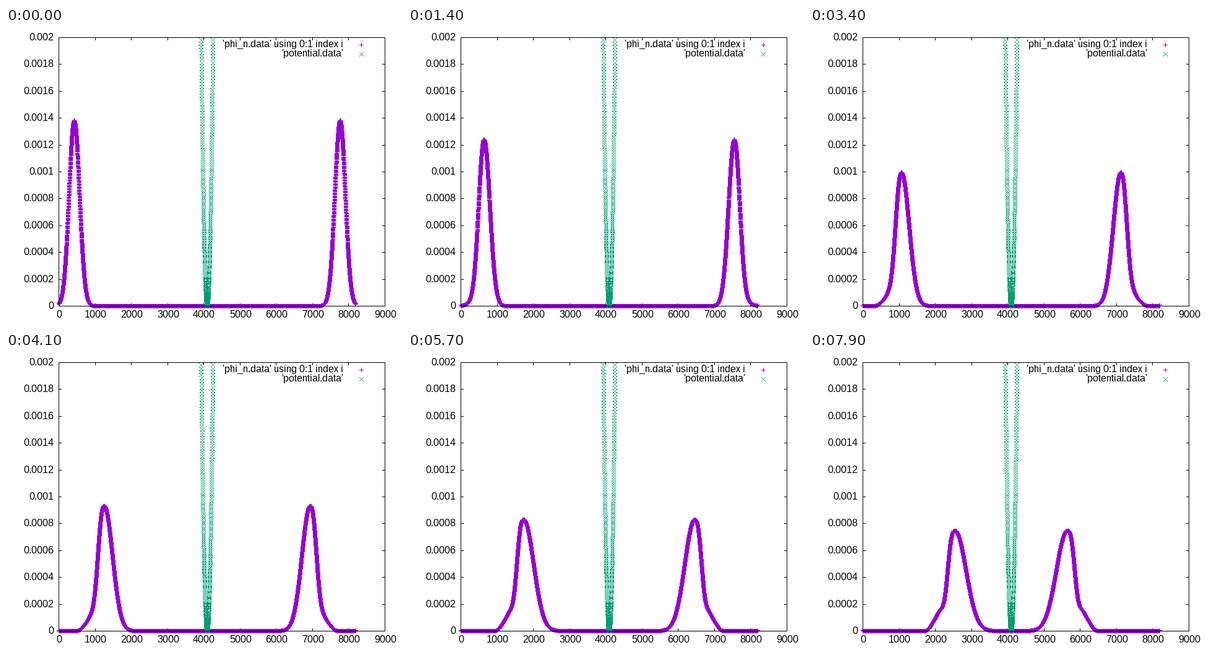
Recreate the animation shown at these times as a matplotlib script. Size 640 by 480 pixels, loop 8 s.

```python
import numpy as np
import matplotlib.pyplot as plt
from matplotlib.animation import FuncAnimation
from matplotlib.markers import MarkerStyle
from matplotlib.path import Path
from matplotlib.transforms import Affine2D

W, H, DPI = 640, 480, 100
PX = 72 / DPI                      # one pixel in points
LEFT, RIGHT, TOP, BASE = 85, 612, 15, 449
TIC = 4
FRAMES, INTERVAL = 80, 100
N = 8192
PURPLE, GREEN = "#9400d3", "#009e73"

plt.rcParams["font.family"] = "Liberation Sans"
plt.rcParams["font.size"] = 16 * PX
plt.rcParams["text.hinting"] = "native"
plt.rcParams["text.hinting_factor"] = 1

fig = plt.figure(figsize=(W / DPI, H / DPI), dpi=DPI, facecolor="white")
ax = fig.add_axes([0, 0, 1, 1])
ax.set_xlim(0, W)
ax.set_ylim(H, 0)
ax.axis("off")


def px_x(v):
    return LEFT + v * (RIGHT - LEFT) / 9000


def px_y(v):
    return BASE - v * (BASE - TOP) / 0.002


def line(xs, ys, z):
    ax.plot(xs, ys, color="black", lw=PX, zorder=z,
            solid_capstyle="projecting", solid_joinstyle="miter")


def pixel(dx, dy):
    return Path.unit_rectangle().transformed(Affine2D().translate(dx, dy - 1))


# Diagonal cross built from whole pixels, so that it stays one pixel thin
CROSS = Path.make_compound_path(
    *[pixel(d, s * d) for d in range(-3, 4) for s in (1, -1)])


def pluses(xs, ys):
    return ax.plot(xs, ys, ls="none", color=PURPLE, ms=6 * PX, mew=PX,
                   marker=MarkerStyle("+", capstyle="projecting"),
                   zorder=2, antialiased=False)[0]


def crosses(xs, ys):
    ax.plot(xs, ys, ls="none", marker=CROSS, ms=8 * PX, mew=0,
            mfc=GREEN, mec="none", zorder=3)


def label(x, y, s, ha="right"):
    ax.text(x, y, s, ha=ha, va="baseline")


# Frame, tics and labels
line([LEFT, RIGHT, RIGHT, LEFT, LEFT], [TOP, TOP, BASE, BASE, TOP], 4)
for i in range(10):
    x = round(px_x(1000 * i))
    line([x, x], [BASE, BASE - TIC], 1)
    line([x, x], [TOP, TOP + TIC], 1)
    label(x + 1, 468, str(1000 * i), "center")
for i in range(11):
    y = round(px_y(0.0002 * i))
    line([LEFT, LEFT + TIC], [y, y], 1)
    line([RIGHT, RIGHT - TIC], [y, y], 1)
    label(77, y + 5, f"{0.0002 * i:.4f}".rstrip("0").rstrip("."))

# Key
label(545, 31, "'phi_n.data' using 0:1 index i")
label(545, 46, "'potential.data'")
pluses([574], [27])
crosses([574], [42])

# Harmonic well, cut off at the top of the plot
n = np.arange(N + 1)
well = 5 * (n / N - 0.5) ** 2
inside = well <= 0.002
crosses(px_x(n[inside]), px_y(well[inside]))

xs = px_x(n)
wave = pluses(xs, np.full(N + 1, BASE))


def gauss(d, s):
    return np.exp(-0.5 * (d / s) ** 2)


def packet(t):
    """Height in pixels of the packet that speeds up to the right."""
    s = t / 7.9
    ease = s * s * (3 - 2 * s)
    peak = 125 + 175 / (1 + (t / 3.55) ** 1.65)
    d = xs - (110 + 7.6 * t + 1.03 * t * t)
    back = np.maximum(-d, 0)
    # The rear gets steeper and trails two ripples
    lag, bump = 19 + 4.5 * s, 0.2 * ease
    rear = np.exp(-(back / (11.8 + 2.6 * s)) ** (2 + 0.9 * ease))
    rear += bump * gauss(back - lag, lag / 3.2)
    rear += 0.2 * bump * gauss(back - 1.55 * lag, lag / 5)
    return peak * np.where(d > 0, gauss(d, 8.5 + 9 * ease), rear)


def update(i):
    t = i * INTERVAL / 1000
    h = packet(t)
    h[0] = max(h[0], 3 * np.exp(-t / 5))
    wave.set_ydata(BASE - h - h[::-1])
    return [wave]


anim = FuncAnimation(fig, update, frames=FRAMES, interval=INTERVAL,
                     repeat=True, repeat_delay=0, blit=False)
plt.show()
```
